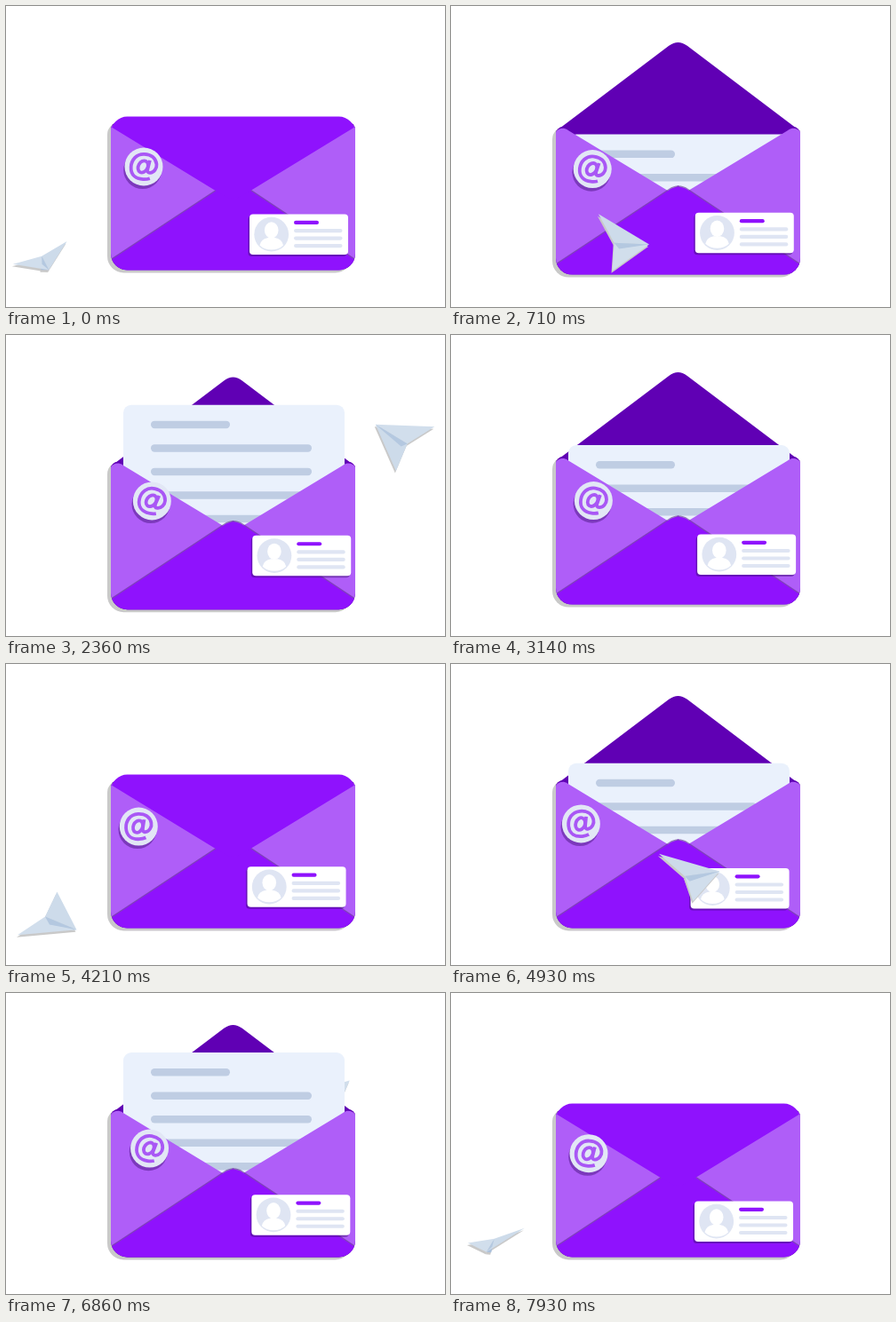
Write an HTML page with a canvas that moves like this. It is 494 px wide and 339 px high and loops after 8000 ms.

```html
<!DOCTYPE html>
<html lang="en">
<head>
<meta charset="utf-8">
<title>Envelope and paper plane</title>
<style>
html, body { margin: 0; width: 100%; height: 100%; overflow: hidden; background: #fff; }
canvas { display: block; }
</style>
</head>
<body>
<canvas id="stage" width="494" height="339"></canvas>
<script>
const ctx = document.getElementById('stage').getContext('2d');
const LOOP = 8000, HALF = 4000;
const PURPLE = '#8f12fd', LIGHT = '#af5ef8', DARK = '#6000b4';
const GREY = '#c9c9c9', LINE = '#bfcde3', PALE = '#dfe5f3';

function ease(from, to, t) {
  const u = Math.min(1, Math.max(0, (t - from) / (to - from)));
  return u < .5 ? 2 * u * u : 1 - 2 * (1 - u) ** 2;
}

// Smooth closed curve through values evenly spaced over the loop
function drift(t, ...v) {
  const n = v.length, s = t / LOOP * n, i = Math.floor(s), u = s - i;
  const [a, b, c, d] = [-1, 0, 1, 2].map(k => v[(i + k + n) % n]);
  return b + u / 2 * (c - a + u * (2 * a - 5 * b + 4 * c - d + u * (3 * (b - c) + d - a)));
}

function fill(path, color) {
  ctx.fillStyle = color;
  ctx.fill(typeof path === 'string' ? new Path2D(path) : path);
}

function box(x, y, w, h, r, color) {
  const p = new Path2D();
  p.roundRect(x, y, w, h, r);
  if (color) fill(p, color);
  return p;
}

function disc(x, y, rx, ry, color) {
  const p = new Path2D();
  p.ellipse(x, y, rx, ry, 0, 0, 7);
  fill(p, color);
}

function at(x, y, draw) {
  ctx.save();
  ctx.translate(x, y);
  draw();
  ctx.restore();
}

const body = box(118, 124.5, 275, 173, 18.5);
const bottom = 'M117 287L245 202.5Q256 195 267 202.5L394 287V300H117Z';
const panel = 'M117 143Q117 132.5 127 132.8Q130 133.3 133 135.8L256 210.3V197L117 288Z';

function flap(h, color) {
  const base = 136, tip = base + h, side = base + h * .925;
  fill(`M118 ${base}L245.2 ${side}Q255.5 ${tip} 265.8 ${side}L393 ${base}Z`, color);
}

function letter(drop) {
  at(0, drop, () => {
    box(132, 67, 249, 220, 9, '#eaf1fc');
    for (let i = 0; i < 5; i++) box(163, 85 + i * 26.5, i ? 181 : 89, 8.5, 4.2, LINE);
  });
}

function envelope(t) {
  const c = t % HALF;
  const bob = t < HALF ? 14.2 * (1 - Math.abs(t - 2000) / 2000) : 0;
  const open = ease(250, 650, c) - ease(3350, 3750, c);
  const raised = ease(680, 1250, c) - ease(2860, 3320, c);
  const h = 84 - 188 * open;
  at(0, bob, () => {
    box(114, 131, 275, 169.5, [14, 14, 18.5, 18.5], GREY);
    box(118, 131, 275, 166.5, [8, 8, 18.5, 18.5], DARK);
    if (h < 0) flap(h, DARK);
    ctx.save();
    ctx.clip(box(118, 0, 275, 297.5, [0, 0, 18.5, 18.5]));
    letter(73 * (1 - raised));
    fill(panel, LIGHT);
    at(511, 0, () => { ctx.scale(-1, 1); fill(panel, LIGHT); });
    at(0, -1.5, () => fill(bottom, 'rgba(95,45,145,.6)'));
    fill(bottom, PURPLE);
    ctx.clip(body);
    if (h >= 0) {
      box(117, 124, 277, 12.5, 0, PURPLE);
      flap(h, PURPLE);
    }
    ctx.restore();
  });
}

function badge(t) {
  const x = drift(t, 155, 165.3, 160, 146, 162.5);
  const y = drift(t, 181, 186, 186.5, 180.5, 174);
  at(x, y, () => {
    disc(-1.3, 3.6, 21.5, 21.5, 'rgba(75,20,130,.5)');
    disc(0, 0, 21.5, 21.5, '#e2e7f5');
    ctx.rotate((x - 152) * .018);
    ctx.strokeStyle = '#a957f5';
    ctx.lineWidth = 3.8;
    ctx.stroke(new Path2D('M6.5-7.5L4.5 2.5Q4 7 7.5 6.5C12 6 15 1 14.3-3.5' +
      'C13-11 7-14.2 0-14.2C-9-14.2-14.3-7-14.3 1C-14.3 10-8 14.2 0 14.2Q4 14.2 7.5 12.8'));
    ctx.beginPath();
    ctx.ellipse(-.8, 0, 5.2, 7, .45, 0, 7);
    ctx.stroke();
  });
}

function card(t) {
  const x = drift(t, 274, 276.3, 277, 269.5, 276.5);
  const y = drift(t, 234.5, 228.5, 224.4, 230, 225);
  at(x, y, () => {
    box(-1.5, 2, 111, 45.5, 4, 'rgba(65,15,120,.5)');
    box(0, 0, 111, 45.5, 4, '#fff');
    disc(24.7, 22.7, 19.4, 19.4, PALE);
    disc(24.7, 18, 7.8, 9.2, '#fff');
    fill('M11.5 35Q13 27.5 21 26.5H28.5Q36.5 27.5 38 35Q33 40 24.7 40Q16.5 40 11.5 35Z', '#fff');
    box(50, 7.3, 28, 4.2, 2.1, PURPLE);
    for (let i = 0; i < 3; i++) box(50, 16.5 + i * 8.5, 54.5, 4.2, 2.1, PALE);
  });
}

// The plane circles the envelope: out in front, back behind
function plane(c) {
  const turn = (c - 60) / HALF * 2 * Math.PI;
  const a = turn + .31 * Math.sin(turn), sin = Math.sin(a), cos = Math.cos(a);
  const x = 248.5 - 208.5 * cos;
  const y = 203 + 83 * cos + 4 * sin + 40 * sin * Math.abs(sin);
  const nx = 33 * Math.tanh(3 * Math.sin(a + .19)), ny = 16 * cos - 3;
  const bank = 2.62 - a, wx = 33 * Math.cos(bank), wy = 33 * Math.sin(bank);

  const nose = [nx, ny], keel = [-2, 13];
  const right = [wx - nx / 2, wy - ny / 2], left = [-wx - nx / 2, -wy - ny / 2];
  const fold = [-nx * .2, -ny * .2];
  const poly = (color, ...pts) => fill('M' + pts.join('L') + 'Z', color);
  at(x, y, () => {
    at(-1, 2.5, () => {
      poly(GREY, nose, right, fold);
      poly(GREY, nose, left, fold);
      poly(GREY, nose, fold, keel);
    });
    poly('#aac0dc', nose, fold, keel);
    poly('#d1deec', nose, right, fold);
    poly('#cddbea', nose, left, fold);
    poly('#b4c8e0', nose, fold, [keel[0] / 2, keel[1] / 2]);
  });
}

function frame(now) {
  const t = now % LOOP, c = t % HALF;
  const behind = c > 1950 && c < 3650;
  ctx.clearRect(0, 0, 494, 339);
  if (behind) plane(c);
  envelope(t);
  badge(t);
  card(t);
  if (!behind) plane(c);
}

const start = performance.now();
function tick() {
  frame(performance.now() - start);
  requestAnimationFrame(tick);
}
tick();
</script>
</body>
</html>
```
